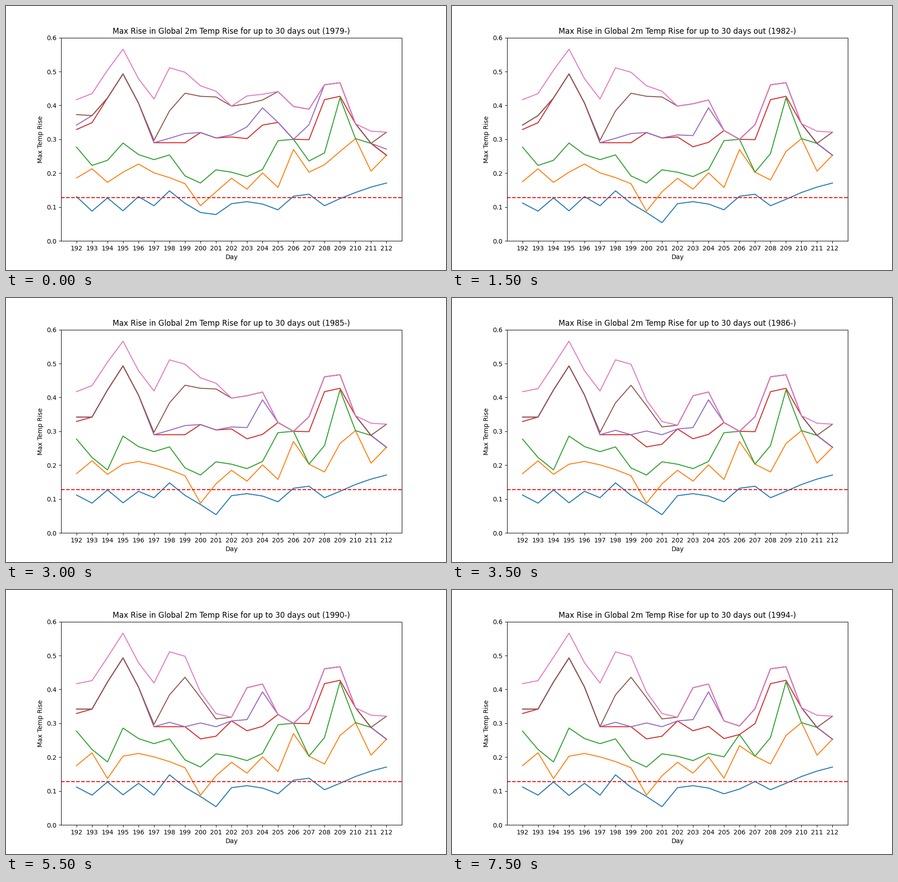
Recreate the animation shown at these times as a matplotlib script. Size 966 by 580 pixels, loop 8000 ms.

```python
import matplotlib.pyplot as plt
import numpy as np
from matplotlib.animation import FuncAnimation

WIDTH, HEIGHT, DPI = 966, 580, 100
FIRST_YEAR, YEARS = 1979, 16
FIRST_DAY = 192
LIMIT = 0.128
TITLE = "Max Rise in Global 2m Temp Rise for up to 30 days out ({}-)"

# Rise per day in thousandths of a degree, one row per lead time
START = {
    "blue": [131, 88, 127, 89, 131, 104, 148, 111, 84, 78, 110,
             116, 109, 92, 132, 138, 104, 125, 143, 159, 171],
    "orange": [186, 213, 173, 203, 227, 201, 187, 169, 104, 145, 185,
               153, 201, 158, 270, 203, 225, 264, 302, 206, 253],
    "green": [277, 223, 238, 289, 255, 240, 254, 192, 171, 210, 203,
              190, 211, 296, 300, 236, 260, 422, 302, 288, 253],
    "red": [329, 349, 422, 493, 407, 290, 290, 290, 320, 304, 307,
            302, 342, 350, 300, 299, 417, 427, 346, 288, 253],
    "purple": [342, 370, 422, 493, 407, 290, 303, 317, 320, 304, 313,
               337, 393, 350, 300, 343, 461, 467, 346, 288, 271],
    "brown": [373, 370, 422, 493, 407, 297, 384, 436, 427, 425, 398,
              405, 416, 441, 397, 389, 461, 467, 346, 288, 321],
    "pink": [417, 435, 504, 566, 479, 419, 511, 498, 458, 442, 398,
             428, 433, 441, 397, 389, 461, 467, 346, 324, 321],
}

# Start year -> values that drop once the earlier years are left out
DROPS = {
    1980: {
        "purple": {212: 253},
        "brown": {206: 388, 207: 362},
        "pink": {206: 388, 207: 362},
    },
    1981: {
        "blue": {201: 54},
        "orange": {200: 88},
        "brown": {192: 342},
    },
    1982: {
        "blue": {192: 112, 209: 123},
        "orange": {192: 175, 208: 180},
        "green": {207: 203, 208: 258},
        "red": {203: 278, 204: 291, 205: 326},
        "purple": {203: 311, 205: 326},
        "brown": {205: 326, 206: 300, 207: 343},
        "pink": {203: 405, 204: 416, 205: 326, 206: 300, 207: 343},
    },
    1983: {
        "blue": {196: 123},
        "orange": {196: 211},
        "green": {194: 186, 195: 286},
        "red": {193: 342},
        "purple": {193: 342},
        "brown": {193: 342},
    },
    1986: {
        "red": {200: 254, 201: 262},
        "purple": {199: 290, 200: 301, 201: 290, 202: 307},
        "brown": {200: 376, 201: 313, 202: 318},
        "pink": {193: 426, 194: 495, 200: 392, 201: 329, 202: 318},
    },
    1988: {"orange": {194: 137}},
    1990: {"blue": {197: 88}},
    1991: {"blue": {195: 87}},
    1994: {
        "blue": {206: 106, 207: 128},
        "orange": {205: 138, 206: 234},
        "green": {205: 201, 206: 267},
        "red": {205: 255, 206: 267},
        "purple": {205: 307, 206: 292},
        "brown": {197: 290, 205: 307, 206: 292},
        "pink": {205: 307, 206: 292},
    },
}


def rises(name, year):
    """Values of one line when only data since `year` counts."""
    values = np.array(START[name]) / 1000
    for since, drops in DROPS.items():
        if since <= year:
            for day, value in drops.get(name, {}).items():
                values[day - FIRST_DAY] = value / 1000
    return values


days = np.arange(FIRST_DAY, FIRST_DAY + len(START["blue"]))

fig, ax = plt.subplots(figsize=(WIDTH / DPI, HEIGHT / DPI), dpi=DPI)
lines = {name: ax.plot(days, rises(name, FIRST_YEAR), color=f"tab:{name}")[0]
         for name in START}
ax.axhline(LIMIT, color="red", linestyle="--")
ax.set_xlim(days[0] - 1, days[-1] + 1)
ax.set_ylim(0, 0.6)
ax.set_xticks(days)
ax.set_xlabel("Day")
ax.set_ylabel("Max Temp Rise")
title = ax.set_title(TITLE.format(FIRST_YEAR))


def update(step):
    year = FIRST_YEAR + step
    for name, line in lines.items():
        line.set_ydata(rises(name, year))
    title.set_text(TITLE.format(year))
    return [*lines.values(), title]


anim = FuncAnimation(fig, update, frames=YEARS, interval=500, repeat=True)
plt.show()
```
